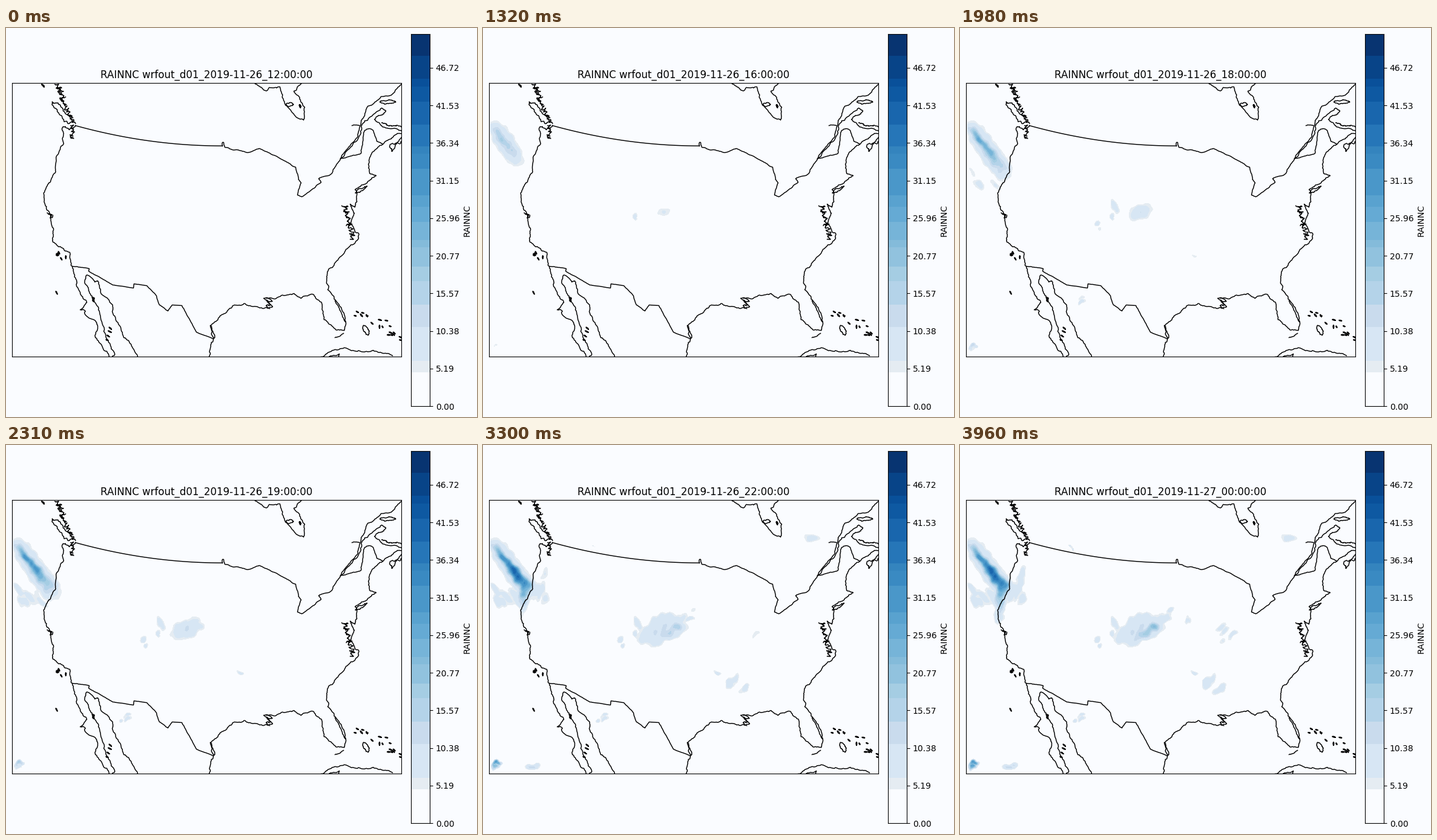
Write a matplotlib script that moves like this. It is 778 px wide and 644 px high and loops after 4.29 s.

```python
import numpy as np
import matplotlib.pyplot as plt
from matplotlib.animation import FuncAnimation

W, H, DPI = 778, 644, 100
FRAMES, STEP = 13, 330
BG = "#fafcff"
LEFT, RIGHT, TOP, BOTTOM = 10, 653, 91, 544
FLOOR = 4.67
rng = np.random.default_rng(26)

LEVELS = [FLOOR, 6.25, 10.9, 14.0, 17.3, 19.3, 21.9, 22.9, 25.4, 27.5,
          29.1, 32.8, 34.9, 35.9, 38.9, 42.0, 44.1, 45.2, 48.4, 51.38]
COLORS = ["#e5ecf2", "#d7e6f4", "#c9dbed", "#b4d3e9", "#a5cde3", "#91c2de",
          "#84bbda", "#76b4d8", "#65aad4", "#59a2cf", "#4a97c9", "#3a8ac2",
          "#3484be", "#2676b8", "#1966ad", "#0e59a2", "#09509a", "#084488",
          "#083471"]

plt.rcParams["font.family"] = "DejaVu Sans"
fig = plt.figure(figsize=(W / DPI, H / DPI), dpi=DPI, facecolor=BG)


def pixel_axes(x0, y0, x1, y1):
    return fig.add_axes([x0 / W, 1 - y1 / H, (x1 - x0) / W, (y1 - y0) / H],
                        facecolor=BG)


# Whole data units sit on pixel centres
ax = pixel_axes(LEFT, TOP, RIGHT, BOTTOM)
ax.set(xlim=(LEFT - .5, RIGHT - .5), ylim=(BOTTOM - .5, TOP - .5),
       xticks=[], yticks=[])
title = ax.set_title("", fontsize=12)

bar = pixel_axes(669, 10, 700, 626)
for lo, hi, c in zip(LEVELS, LEVELS[1:], COLORS):
    bar.axhspan(lo, hi, color=c, lw=0)
bar.set(xlim=(0, 1), ylim=(0, LEVELS[-1]), xticks=[])
bar.yaxis.tick_right()
bar.yaxis.set_label_position("right")
ticks = np.arange(10) * 5.1913
bar.set_yticks(ticks, [f"{t:.2f}" for t in ticks])
bar.set_ylabel("RAINNC", fontsize=10)


# Map outlines
def line(pts, rough=0.1):
    """Polyline through flat x, y pairs, roughened by midpoint displacement."""
    p = np.reshape(pts, (-1, 2)).astype(float)
    for _ in range(4 if rough else 0):
        d = np.diff(p, axis=0)
        size = np.hypot(*d.T)[:, None]
        mid = p[:-1] + d / 2
        shift = rng.normal(0, rough, (len(d), 1)) * np.minimum(size, 12)
        mid += shift * d[:, ::-1] * [-1, 1] / np.maximum(size, 1e-9)
        p = np.insert(p, np.arange(1, len(p)), mid, axis=0)
    ax.plot(*p.T, color="black", lw=1.05, solid_joinstyle="round", zorder=3)


def loop(x, y, a, b, deg=0):
    """Ragged island outline."""
    t, r = np.linspace(0, 2 * np.pi, 9), np.radians(deg)
    u, v = a * np.cos(t), b * np.sin(t)
    line(np.c_[x + u * np.cos(r) - v * np.sin(r),
               y + u * np.sin(r) + v * np.cos(r)], 0.12)


def inlets(x0, y0, x1, y1, reach, n):
    """Zigzag of narrow bays around an axis."""
    t = np.linspace(0, 1, n)
    side = reach * np.where(np.arange(n) % 2, 1, -1) * rng.uniform(.3, 1, n)
    line(np.c_[x0 + (x1 - x0) * t + side,
               y0 + (y1 - y0) * t + rng.normal(0, 1.5, n)], 0.15)


def islets(x, y, rx, ry, n):
    for dx, dy in rng.uniform(-1, 1, (n, 2)):
        loop(x + rx * dx, y + ry * dy, rng.uniform(1.5, 3), 0.7,
             rng.uniform(0, 90))


border = np.linspace(114, 357, 60)
line(np.c_[border, 161 + 33.7 * (1 - ((357 - border) / 243) ** 2)], 0)
line([357, 195, 357, 189, 359, 189, 361, 197, 380, 201, 403, 205, 418, 199,
      457, 218, 478, 230, 487, 256, 481, 276, 488, 279, 520, 255, 516, 249,
      538, 240, 552, 216, 586, 207, 592, 169, 599, 166, 606, 169, 612, 187,
      622, 192], 0.05)
line([109, 394, 137, 398, 136, 402, 176, 425, 210, 430, 211, 423, 232, 426,
      248, 443, 253, 458, 267, 468, 274, 458, 290, 459, 314, 503, 342, 514],
     0.03)

# Pacific side
line([94, 163, 94, 188, 81, 230, 70, 256, 62, 272, 66, 297, 73, 309, 78, 334,
      77, 354, 105, 371, 109, 394, 116, 417, 116, 427, 133, 454, 122, 466,
      147, 484, 151, 494, 147, 512, 170, 544])
line([175, 544, 179, 541, 169, 520, 154, 470, 139, 440, 130, 416, 132, 409,
      146, 420, 151, 418, 156, 438, 176, 462, 175, 469, 194, 512, 202, 517,
      217, 544])
line([76, 122, 90, 130, 109, 154, 102, 158, 84, 137, 76, 122], 0.15)
line([94, 163, 104, 168, 114, 161], 0.15)
inlets(84, 92, 93, 117, 6, 14)
inlets(92, 117, 112, 160, 4, 18)
inlets(109, 160, 109, 185, 4, 14)
inlets(70, 305, 75, 313, 4, 6)
islets(61, 95, 1, 2, 2)
islets(90, 374, 9, 9, 6)
islets(83, 437, 0, 1, 1)
islets(145, 448, 4, 5, 3)
islets(169, 510, 4, 15, 4)

# Gulf and Atlantic side
line([335, 544, 343, 513, 337, 493, 353, 476, 377, 458, 402, 459, 424, 464,
      440, 461, 425, 447, 446, 447, 475, 439, 487, 447, 504, 440, 520, 453,
      525, 478, 544, 499, 558, 500])
line([558, 500, 561, 488, 555, 468, 538, 441, 529, 422, 530, 407, 545, 386,
      561, 366, 578, 352, 582, 347, 570, 324, 575, 306, 568, 291, 576, 296,
      579, 286, 576, 267, 600, 252, 611, 244, 600, 240, 598, 225, 604, 206,
      622, 192, 640, 178, 653, 174])
line([342, 514, 337, 492], 0.1)
line([560, 486, 543, 451], 0.05)
inlets(433, 447, 433, 462, 7, 6)
inlets(559, 292, 566, 324, 6, 15)
inlets(568, 324, 572, 350, 5, 11)
loop(586, 267, 11, 2, -30)

# North-east and the bay
line([552, 216, 581, 178, 586, 153, 597, 129, 619, 113, 635, 111, 653, 92],
     0.06)
line([552, 216, 584, 177, 592, 153, 620, 132, 627, 137, 608, 151, 621, 163,
      653, 170])
line([571, 161, 583, 161])
line([653, 180, 633, 196, 637, 204, 653, 187], 0.15)
inlets(622, 158, 650, 164, 3, 8)
loop(630, 122, 13, 2.5)
line([411, 92, 431, 103, 452, 97, 461, 127, 480, 148, 491, 152, 493, 131,
      475, 104, 487, 92])
loop(468, 126, 6, 3)
islets(482, 128, 5, 8, 2)

# Caribbean
line([520, 544, 531, 537, 556, 530, 594, 535, 606, 533, 638, 542])
line([533, 544, 550, 539, 549, 543])
line([543, 512, 557, 505])
loop(594, 500, 4, 9, -25)
islets(584, 473, 12, 4, 6)
islets(620, 488, 16, 6, 6)
islets(634, 506, 14, 3, 5)
islets(650, 515, 2, 4, 2)

# Rain cells: x, y, half-length, half-width, angle, peak, start, duration
cells = []


def cell(*values):
    cells.append(values)


def cluster(x, y, rx, ry, n, deg, peak, start, size):
    """Scattered showers that set in one after another."""
    for i in range(n):
        dx, dy = rng.uniform(-1, 1, 2)
        cell(x + rx * dx, y + ry * dy, size * rng.uniform(.7, 1.3),
             size * rng.uniform(.35, .5), deg + rng.normal(0, 8), peak,
             start + 2.5 * i / n, peak / 4)


# Coastal storm: a front advancing to the south-east
for s in np.linspace(0, 1, 9):
    x, y = 26 + 44 * s, 176 + 58 * s
    cell(x, y, 25, 13 + 4 * s, 60, 11, 4.5 * s, 2.2)
    cell(x, y, 18, 7 + 8 * s, 48, 20 + 17 * np.sin(2.4 * s), 1 + 3 * s,
         5 + 2 * s)
for s in np.linspace(0, 1, 4):
    cell(67 - 3 * s, 245 + 36 * s, 15, 12 - 4 * s, 95, 22 - 10 * s,
         6 + 2.5 * s, 4)
cluster(24, 171, 5, 3, 3, 30, 10, 1, 12)
cluster(40, 250, 20, 12, 7, 48, 8, 4, 13)
cluster(88, 235, 14, 22, 10, 115, 8, 7, 10)

# Plains storm: spreading out from its centre
for i in range(18):
    r, a = np.sqrt(i / 18), 2.4 * i
    u, v = 34 * r * np.cos(a), 19 * r * np.sin(a)
    cell(298 + .9 * u + .42 * v, 304 - .42 * u + .9 * v, 15, 8, -28, 9.5,
         2 + 5 * r, 3)
for s in np.linspace(0, 1, 4):
    cell(296 + 24 * s, 316 - 14 * s, 15, 9, -40, 13 + 8 * s, 5, 7)

cluster(254, 298, 3, 16, 3, 75, 8, 2, 9)
cluster(229, 328, 6, 10, 5, -50, 8, 3, 6)
cluster(342, 285, 10, 14, 4, -30, 8, 8, 8)
cluster(420, 398, 14, 12, 8, -52, 8, 7, 9)
cluster(438, 312, 12, 14, 4, -38, 8, 8.5, 9)
cluster(378, 288, 3, 4, 2, 95, 8, 9, 7)
cluster(387, 376, 4, 1, 2, 10, 8, 4.5, 5)
cluster(543, 153, 10, 2, 4, 10, 6.5, 6, 8)
cluster(194, 452, 8, 6, 3, -38, 8, 3.5, 6)
cluster(183, 168, 3, 4, 2, 50, 8, 8.5, 4)
cluster(22, 530, 5, 4, 5, -45, 30, 2.5, 7)
cluster(83, 531, 7, 4, 4, -10, 11, 6, 8)

gx, gy = np.meshgrid(np.arange(12, 653, 2.0), np.arange(92, 544, 2.0))


def ripple(lo, hi, n=9):
    """Smooth seeded noise from waves of lo to hi pixels."""
    out = np.zeros_like(gx)
    for _ in range(n):
        k, a, p = 2 * np.pi / rng.uniform(lo, hi), *rng.uniform(0, 2 * np.pi, 2)
        out += np.sin(k * (gx * np.cos(a) + gy * np.sin(a)) + p)
    return out / np.sqrt(n)


wx, wy = gx + 1.6 * ripple(12, 40), gy + 1.6 * ripple(12, 40)
grain = 1 + 0.07 * ripple(8, 26)


def bell(x, y, a, b, deg, peak, *_):
    """Bump that falls from the peak to FLOOR on the ellipse a, b."""
    c, s = np.cos(np.radians(deg)), np.sin(np.radians(deg))
    u, v = (wx - x) * c + (wy - y) * s, (wy - y) * c - (wx - x) * s
    return np.exp(-np.log(peak / FLOOR) * ((u / a) ** 2 + (v / b) ** 2))


bells = np.array([bell(*c) for c in cells]) ** 4
peak, start, duration = np.array([c[5:] for c in cells]).T


def rainfall(hour):
    grown = peak * np.clip((hour - start) / duration, 0, 1)
    total = np.tensordot(grown ** 4, bells, 1) ** 0.25
    return np.minimum(total * grain, 48.3)


layers = []


def update(i):
    while layers:
        layers.pop().remove()
    layers.append(ax.contourf(gx, gy, rainfall(i), LEVELS, colors=COLORS,
                              zorder=1))
    day, hour = divmod(12 + i, 24)
    title.set_text(f"RAINNC wrfout_d01_2019-11-{26 + day}_{hour:02d}:00:00")
    return layers


anim = FuncAnimation(fig, update, frames=FRAMES, init_func=lambda: [],
                     interval=STEP, repeat=True, repeat_delay=0)
plt.show()
```
